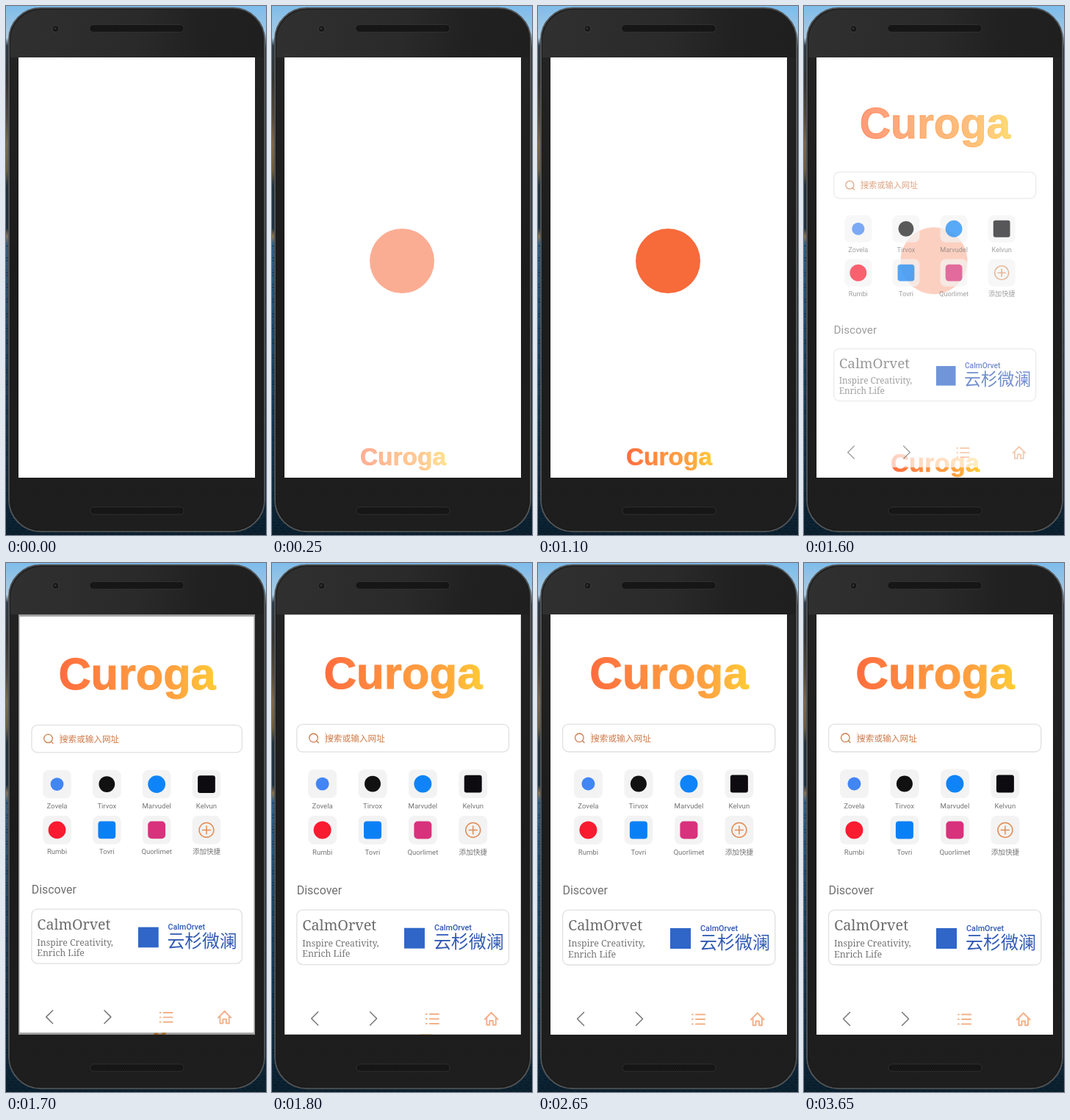
Write an HTML page with a canvas that moves like this. It is 354 px wide and 720 px high and loops after 3700 ms.

```html
<!DOCTYPE html>
<html lang="zh">
<head>
<meta charset="utf-8">
<title>Phone launch</title>
<style>
html, body { margin: 0; width: 100%; height: 100%; overflow: hidden; background: #1d1d1d; }
canvas { display: block; width: 354px; height: 720px; }
</style>
</head>
<body>
<canvas id="stage"></canvas>
<script>
const W = 354, H = 720, LOOP = 3700;
const OPEN = 1532, SETTLED = 1850;
const SCREEN = { x: 17, y: 70, w: 322, h: 572 };
const CX = 178, CY = 356;
const SANS = 'Roboto, "Noto Sans CJK SC", "Noto Sans CJK", sans-serif';
const CJK = '"Noto Sans CJK SC", "Noto Sans CJK", sans-serif';
const SERIF = '"Noto Serif", serif';
const BRAND = 'Curoga';

const canvas = document.getElementById('stage');
const ctx = canvas.getContext('2d');
const dpr = window.devicePixelRatio || 1;
canvas.width = W * dpr;
canvas.height = H * dpr;

const clamp = v => Math.max(0, Math.min(1, v));

function gradient(x0, y0, x1, y1, stops) {
  const g = ctx.createLinearGradient(x0, y0, x1, y1);
  for (const [at, color] of stops) g.addColorStop(at, color);
  return g;
}

function box(x, y, w, h, r, fill, stroke, lw = 1) {
  ctx.beginPath();
  ctx.roundRect(x, y, w, h, r);
  if (fill) { ctx.fillStyle = fill; ctx.fill(); }
  if (stroke) { ctx.strokeStyle = stroke; ctx.lineWidth = lw; ctx.stroke(); }
}

function disc(x, y, r, fill, stroke, lw = 1) {
  box(x - r, y - r, 2 * r, 2 * r, r, fill, stroke, lw);
}

function lines(color, lw, ...paths) {
  ctx.strokeStyle = color;
  ctx.lineWidth = lw;
  ctx.lineCap = ctx.lineJoin = 'round';
  ctx.beginPath();
  for (const p of paths)
    for (let i = 0; i < p.length; i += 2)
      i ? ctx.lineTo(p[i], p[i + 1]) : ctx.moveTo(p[i], p[i + 1]);
  ctx.stroke();
}

function text(str, x, y, font, color, align = 'left') {
  ctx.font = font;
  ctx.fillStyle = color;
  ctx.textAlign = align;
  ctx.fillText(str, x, y);
}

function wordmark(y, size) {
  const x = 178.5, half = size * 1.75;
  const paint = gradient(x - half, 0, x + half, 0,
    [[0, '#ff6c3e'], [0.45, '#ff9440'], [0.72, '#ffa040'], [1, '#ffcb36']]);
  text(BRAND, x, y, `bold ${size}px "Liberation Sans", Arial, sans-serif`, paint, 'center');
  ctx.strokeStyle = paint;
  ctx.lineWidth = size / 60;
  ctx.lineJoin = 'round';
  ctx.strokeText(BRAND, x, y);
}

function speaker(x, y, w, h) {
  box(x, y, w, h, h / 2, '#141414', '#303030', 1);
  ctx.fillStyle = '#272727';
  for (let j = 0; j < 3; j++)
    for (let i = 4; i < w - 4; i += 3)
      ctx.fillRect(x + i + j % 2 * 1.5, y + 2.3 + j * 2.5, 1, 1);
}

function backdrop() {
  ctx.fillStyle = gradient(0, 0, 0, H, [
    [0, '#7fbcea'], [0.06, '#a9cbe2'], [0.075, '#2c3b48'], [0.14, '#33332f'],
    [0.21, '#54483a'], [0.26, '#7d6749'], [0.31, '#6d5d3c'], [0.34, '#20313b'],
    [0.42, '#1c303e'], [0.435, '#8b7450'], [0.45, '#2d5f85'], [0.6, '#1d4a6c'],
    [0.8, '#12344d'], [1, '#0b2130']]);
  ctx.fillRect(0, 0, W, H);
  ctx.fillStyle = gradient(0, 0, 0, H, [
    [0, '#7dbcec'], [0.05, '#9ec6e2'], [0.08, '#34383b'], [0.45, '#2a3236'],
    [0.9, '#142a3a'], [1, '#0b2130']]);
  ctx.fillRect(300, 0, 54, H);
  // Ripples on the water
  ctx.fillStyle = 'rgba(4, 14, 24, 0.35)';
  for (let y = 326; y < H; y += 4) {
    const shift = 3 * Math.sin(y * 12.9);
    for (let x = -4; x < W; x += 9) ctx.fillRect(x + shift, y, 5, 1.5);
  }
}

function phone() {
  box(4, 2.8, 348, 712.4, 43, '#1d1d1d', '#505254', 2);
  box(5.5, 4.3, 345, 709.4, 42, gradient(0, 0, 0, H,
    [[0, '#282828'], [0.1, '#232323'], [0.5, '#1c1c1c'], [1, '#1e1e1e']]), '#191919', 1);
  box(6, 5, 344, 65, [42, 42, 0, 0], gradient(6, 20, 350, 60,
    [[0, '#303030'], [0.5, '#2a2a2a'], [0.75, '#212121'], [1, '#1f1f1f']]));
  speaker(114, 25.5, 128, 10);
  speaker(115, 682, 127, 10);
  disc(67.5, 31, 4.5, '#171717', '#404040', 1);
  disc(67, 30.5, 1.6, '#2c3238');
}

function splash() {
  disc(177, 347, 44, '#f76a3a');
  wordmark(625.2, 33.5);
}

// Each shortcut: label, colour, half size, corner radius
const SHORTCUTS = [
  ['Zovela', '#4285f4', 9, 9],
  ['Tirvox', '#111111', 11, 11],
  ['Marvudel', '#0f84f8', 12, 12],
  ['Kelvun', '#0d0b10', 12, 3],
  ['Rumbi', '#f91b30', 12, 12],
  ['Tovri', '#0a80f5', 12, 4],
  ['Quorlimet', '#d8327c', 12, 5],
  ['添加快捷']
];

function shortcut([label, color, r, corner], i) {
  const x = 68.4 + i % 4 * 68.5, y = 300.5 + (i >> 2) * 63;
  box(x - 19.5, y - 19.5, 39, 39, 8, '#f3f3f3');
  if (color) box(x - r, y - r, 2 * r, 2 * r, corner, color);
  else {
    disc(x, y, 10, null, '#e28c55', 1.5);
    lines('#e28c55', 1.5, [x - 5.5, y, x + 5.5, y], [x, y - 5.5, x, y + 5.5]);
  }
  text(label, x, y + 33.2, '9.6px ' + SANS, '#757575', 'center');
}

function navBar() {
  lines('#777', 1.5, [62.5, 611.5, 53.5, 620.5, 62.5, 629.5], [133.5, 611.5, 142.5, 620.5, 133.5, 629.5]);
  for (const y of [614.5, 621, 627.5])
    lines('#f3b088', 2, [210, y, 210.8, y], [215, y, 227, y]);
  lines('#f3b088', 1.9, [290, 621.5, 298.8, 612.5, 307.6, 621.5],
    [292.6, 620, 292.6, 629.3, 296.5, 629.3, 296.5, 623.5, 301.1, 623.5, 301.1, 629.3, 305, 629.3, 305, 620]);
}

function home(cursor) {
  ctx.fillStyle = '#fff';
  ctx.fillRect(SCREEN.x, SCREEN.y, SCREEN.w, SCREEN.h);
  wordmark(170.5, 61.8);

  box(33.5, 219.3, 289.3, 37.7, 8, null, '#e0e0e0', 1.3);
  disc(56.3, 237.8, 5.8, null, '#cd7b4b', 1.3);
  lines('#cd7b4b', 1.3, [60.5, 242, 63, 244.5]);
  text('搜索或输入网址', 72, 242.6, '11.7px ' + CJK, '#ce7a49');
  if (cursor) {
    ctx.fillStyle = '#f0c8ae';
    ctx.fillRect(72.2, 230.5, 1, 15);
  }

  SHORTCUTS.forEach(shortcut);

  text('Discover', 33.4, 451, '16px ' + SANS, '#707070');
  box(33.5, 472.3, 289.3, 74.7, 8, null, '#e0e0e0', 1.3);
  text('CalmOrvet', 41, 500, '19.8px ' + SERIF, '#6c6c6c');
  text('Inspire Creativity,', 41, 522.2, '12.3px ' + SERIF, '#757575');
  text('Enrich Life', 41, 536.7, '12.3px ' + SERIF, '#757575');
  box(180, 497, 28, 28, 0, '#2f66c8');
  text('CalmOrvet', 221, 500.5, '500 10.8px ' + SANS, '#3059b4');
  text('云杉微澜', 220, 524.8, '500 24px ' + CJK, '#3059b4');
  navBar();
}

function scaled(s, paint) {
  ctx.save();
  ctx.translate(CX, CY);
  ctx.scale(s, s);
  ctx.translate(-CX, -CY);
  paint();
  ctx.restore();
}

function render(t) {
  ctx.setTransform(dpr, 0, 0, dpr, 0, 0);
  backdrop();
  phone();
  ctx.save();
  ctx.beginPath();
  ctx.rect(SCREEN.x, SCREEN.y, SCREEN.w, SCREEN.h);
  ctx.clip();
  ctx.fillStyle = '#fff';
  ctx.fillRect(0, 0, W, H);

  // Both pages settle along the same exponential curve
  const rest = t < OPEN ? 1 : t < SETTLED ? Math.exp((OPEN - t) * 0.0161) : 0;
  const shown = clamp((t - OPEN - 12) / 83);
  if (rest) {
    ctx.globalAlpha = 1 - Math.pow(1 - clamp((t - 100) / 500), 2.2);
    scaled(1 + 0.05 * (1 - rest), splash);
  }
  if (shown) {
    if (rest && shown === 1) {
      ctx.globalAlpha = 0.38;
      ctx.fillStyle = '#000';
      ctx.fillRect(0, 0, W, H);
    }
    ctx.globalAlpha = shown;
    const cursor = t < 2100 || (t >= 2600 && t < 3100) || t >= 3650;
    scaled(1 - 0.15 * rest, () => home(cursor));
  }
  ctx.restore();
}

const start = performance.now();
function tick() {
  render((performance.now() - start) % LOOP);
  requestAnimationFrame(tick);
}
tick();
</script>
</body>
</html>
```
